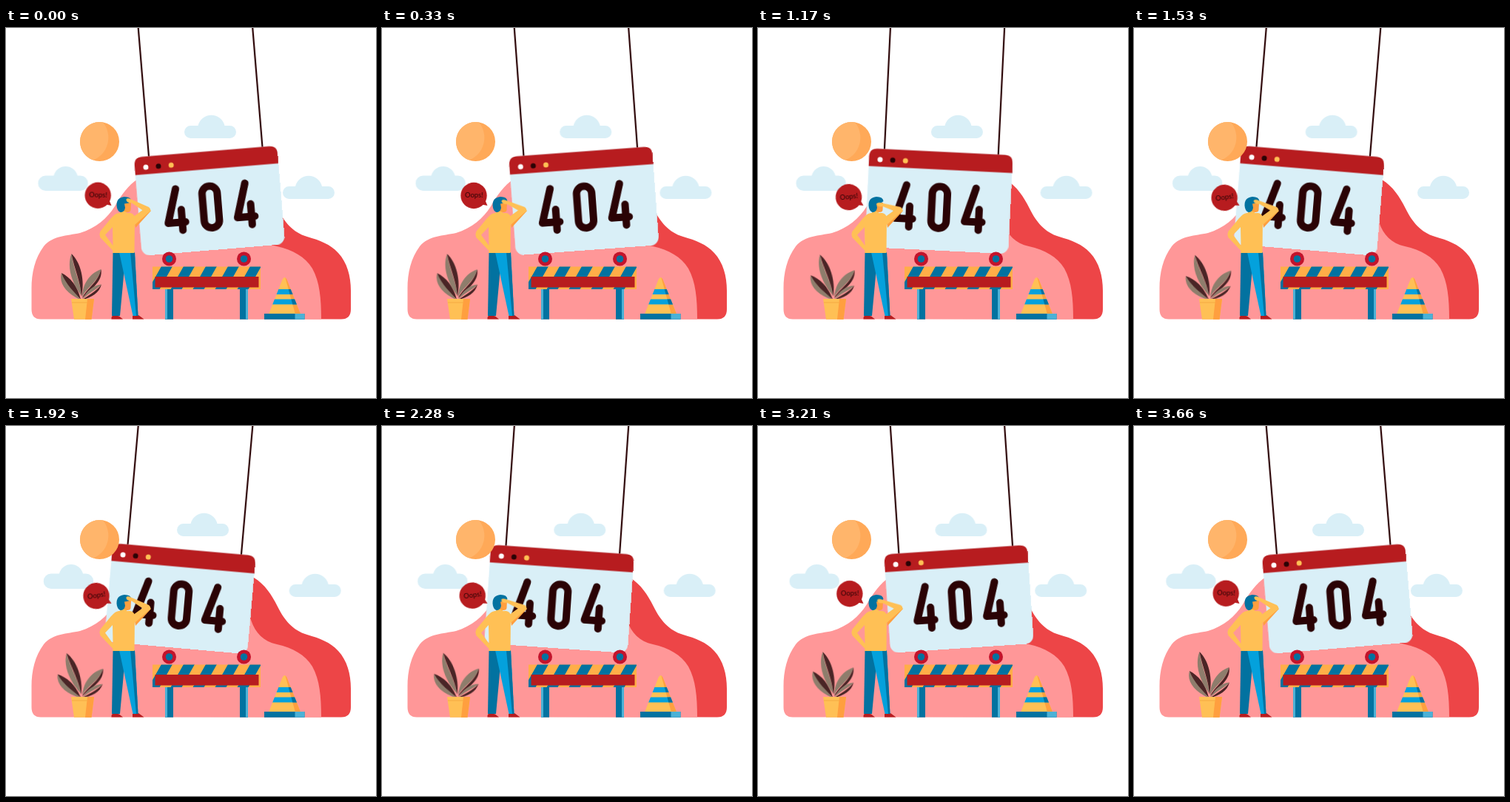
Animation, 500 px wide and 500 px high, one loop 3.69 s. Source, as an HTML page:

```html
<!DOCTYPE html>
<html lang="en">
<head>
<meta charset="utf-8">
<title>404</title>
<style>
  html, body { margin: 0; width: 100%; height: 100%; overflow: hidden; background: #fff; }
  svg { display: block; width: 100vw; height: 100vh; }
  .sky { fill: #d9eff7; }
  .red { fill: #b71c1f; }
  .yel { fill: #ffc055; }
  .org { fill: #ff9f3f; }
  .navy { fill: #0272a0; }
  .blue { fill: #04a1dc; }
  .pale { fill: #4bb1d6; }
  .dark { fill: #2a0305; }
  .ink { fill: none; stroke: #2a0305; }
  .num { stroke-width: 10; stroke-linecap: round; stroke-linejoin: round; }
  .leaf path:first-child { fill: #8e7d6c; }
  .leaf path:last-child { fill: #4a2526; }
  text { font: 9.4px Lato, sans-serif; text-anchor: middle; fill: #2a0305; }
</style>
</head>
<body>
<svg viewBox="0 0 500 500">
  <defs>
    <clipPath id="board"><path d="M198 322.500H344V353H198Z"/></clipPath>
    <clipPath id="coneCut"><path d="M373.500 340Q376.500 334 379.500 340L398 386.500H355Z"/></clipPath>
    <path id="four" class="ink num" d="M19 5.500L5.500 51H29M24.500 34V62"/>
  </defs>

  <g class="sky">
    <path id="cloudTop" d="M249.500 132H259.500A18.500 18.500 0 0 1 295.500 132H302.500A8.500 8.500 0 0 1 302.500 149H249.500A8.500 8.500 0 0 1 249.500 132Z"/>
    <path id="cloudLeft" d="M53 199.500H64A16.500 16.500 0 0 1 96 199.500H100A10 10 0 0 1 100 220H53A10 10 0 0 1 53 199.500Z"/>
    <path id="cloudRight" d="M382.500 214H391A18.500 18.500 0 0 1 427 214H435.500A8.500 8.500 0 0 1 435.500 231H382.500A8.500 8.500 0 0 1 382.500 214Z"/>
  </g>

  <path fill="#ed4547" d="M200 393V205H335C350 214 359 228 367 244C376 262 387 276 407 282C424 287 438 292 449 304C461 317 466 335 466 355V380Q466 393.500 453 393.500Z"/>
  <path fill="#ff9798" d="M47 393.500Q34.500 393.500 34.500 380V352C34.500 331 39 311 51 295C64 280 82 281 100 277C122 270 136 258 147 241C156 225 165 213 178 204H300C322 215 324 243 331 262C337 280 348 291 366 295C388 300 404 309 414 325C424 343 426 366 426 393.500Z"/>

  <g id="sign">
    <path class="ink" stroke-width="2.200" d="M179 -20V170M333 -20V170"/>
    <rect class="sky" x="158.800" y="167.500" width="194" height="133.500" rx="11"/>
    <path class="red" d="M158.800 191.500V178.500Q158.800 167.500 169.800 167.500H341.800Q352.800 167.500 352.800 178.500V191.500Z"/>
    <circle cx="173.800" cy="182" r="3.500" fill="#fff"/>
    <circle class="dark" cx="190.900" cy="182" r="3.500"/>
    <circle class="yel" cx="208.100" cy="182" r="3.500"/>
    <g role="img" aria-label="404">
      <use href="#four" x="192.300" y="209"/>
      <rect class="ink num" x="246.500" y="214.500" width="20.500" height="56.500" rx="10"/>
      <use href="#four" x="286.300" y="209"/>
    </g>
  </g>

  <circle cx="126.500" cy="153.500" r="26.500" fill="#ffa958"/>
  <path fill="#ffb56b" d="M131 127.400A26.500 26.500 0 0 0 118 178.600A33 33 0 0 0 131 127.400Z"/>

  <g id="lights"></g>
  <g clip-path="url(#board)">
    <path fill="#ffae48" d="M198 322H344V353H198Z"/>
    <g id="stripes"></g>
  </g>
  <path class="red" d="M201.500 336H341.500V350.500H201.500Z"/>

  <g clip-path="url(#coneCut)">
    <path class="yel" d="M350 335H402V387H350Z"/>
    <path class="org" d="M376.500 334H402V387H391Z"/>
    <path class="blue" d="M350 353H402V360H350ZM350 366.500H402V373.500H350Z"/>
    <path class="navy" d="M381.700 353H402V360H383.600ZM385.400 366.500H402V373.500H387.300Z"/>
  </g>
  <path class="navy" d="M349 386H403.500V393.700H349Z"/>
  <path class="pale" d="M390.500 386H403.500V393.700H390.500Z"/>

  <g id="leafLeft" class="leaf">
    <path d="M75 331C71 345 81 358 100 367C93 355 81 345 75 331Z"/>
    <path d="M75 331C87 337 97 349 101 367C92 356 81 347 75 331Z"/>
  </g>
  <g id="leafMid" class="leaf">
    <path d="M88.500 305C82 322 88 343 102 362C101 345 91 325 88.500 305Z"/>
    <path d="M88.500 305C101 317 107 341 102 363C101 343 92 325 88.500 305Z"/>
  </g>
  <g id="leafRight" class="leaf">
    <path d="M128.500 326C112 332 103 347 103 364C108 351 125 343 128.500 326Z"/>
    <path d="M128.500 326C131 342 117 351 103 365C109 352 125 343 128.500 326Z"/>
  </g>
  <g id="leafLow" class="leaf">
    <path d="M129 346.500C119 347 109 355 103 367C111 358 121 355 129 346.500Z"/>
    <path d="M129 346.500C126 358 116 364 103 367.500C111 361 121 357 129 346.500Z"/>
  </g>
  <path class="yel" d="M88 366H119L115.500 393.700H92Z"/>
  <path class="org" d="M110 366H119L115.500 393.700H107Z"/>
  <path fill="#f5a940" d="M89 370.500H110V371.500H89Z"/>

  <path class="red" d="M142.500 393.500Q142 388 147 388L153 389.500L158 393.500ZM171 393.500V389L179 388L186.500 393.500Z"/>
  <path class="navy" d="M144.500 303H162L154 389H143Z"/>
  <path class="blue" d="M153 303H174L178.500 389H171.500Z"/>
  <path class="navy" d="M168 303H174L178.500 389H176Z"/>
  <path class="yel" d="M145 254Q150 249 158 250H168Q173 251 174 256L173.500 304H144L144.500 301L127.300 283Q125.500 279 127.300 275L142 257ZM144 269L134 279.500L144.500 294Z"/>
  <path class="yel" d="M154 236H163V254H154Z"/>
  <path class="org" d="M158 236H169L168.500 246Q168 249.500 163 249L158 247Z"/>
  <path class="navy" d="M149.500 240Q149 229 160 228Q169 228 169.500 234Q167 237 160 237.500L161 243Q160 249 154.500 249Q150 247 149.500 240Z"/>
  <path class="org" d="M174 263L192 246L196 247L175 270Z"/>
  <path class="yel" d="M168 258L186 245L196 246.500L174 266Z"/>
  <path id="arm" class="yel" d="M162.500 231.500Q164 229 169 231.500L193 242Q197 245.500 194 248.500L187 248L170 236.500Q162 236 162.500 231.500Z"/>

  <g id="bubble">
    <circle class="red" cx="124" cy="226.500" r="17.700"/>
    <path class="red" d="M139 232L142.500 240L132 238Z"/>
    <text x="124.300" y="229.300">Oops!</text>
  </g>
</svg>
<script>
  const T = 3690;
  const SINE = 'cubic-bezier(.37,0,.63,1)';
  const $ = id => document.getElementById(id);
  const rot = a => `rotate(${a}deg)`;
  const shift = x => `translateX(${x}px)`;

  function draw(parent, tag, attrs) {
    const el = document.createElementNS('http://www.w3.org/2000/svg', tag);
    for (const k in attrs) el.setAttribute(k, attrs[k]);
    $(parent).append(el);
  }

  for (let i = 0; i < 5; i++) {
    draw('stripes', 'path', { class: 'navy', d: `M${210 + i * 30} 322h15l-18 32h-15Z` });
  }
  // Each post is lit on its outer edge
  for (const [x, side] of [[220.5, -1], [321.5, 1]]) {
    draw('lights', 'path', { class: 'navy', d: `M${x - 5.5} 350h11v43.700h-11Z` });
    draw('lights', 'path', { class: 'pale', d: `M${x + side * 5.5} 350h${-side * 3}v43.700h${side * 3}Z` });
    draw('lights', 'circle', { fill: '#c3142c', cx: x, cy: 312, r: 9.5 });
    draw('lights', 'circle', { class: 'navy', cx: x, cy: 312, r: 4.8 });
  }

  // Back-and-forth motion between two transforms
  function sway(id, from, to, { pivot = '0 0', delay = 0, half = T / 2 } = {}) {
    const el = $(id);
    el.style.transformOrigin = pivot;
    el.animate({ transform: [from, to] }, {
      duration: half, delay, easing: SINE, direction: 'alternate', iterations: Infinity
    });
  }

  sway('cloudTop', shift(0), shift(-10));
  sway('cloudLeft', shift(-0.4), shift(9.2), { delay: -370 });
  sway('cloudRight', shift(-0.3), shift(9.1), { delay: -190 });
  sway('bubble', rot(1), rot(-9.5), { pivot: '142px 240px' });
  sway('arm', rot(0), rot(-14), { pivot: '192px 245px', half: T / 4 });
  sway('leafLeft', rot(0), rot(-9), { pivot: '101px 367px' });
  sway('leafMid', rot(0), rot(-6.5), { pivot: '102px 365px' });
  sway('leafRight', rot(0), rot(4), { pivot: '103px 366px' });
  sway('leafLow', rot(0), rot(5), { pivot: '103px 367px' });

  $('sign').style.transformOrigin = '256px 0px';
  const left = rot(5.1), right = rot(-4.7), easing = 'cubic-bezier(.5,0,.5,1)';
  $('sign').animate([
    { transform: right, offset: 0, easing },
    { transform: left, offset: 0.492, easing },
    { transform: right, offset: 0.984 },
    { transform: right, offset: 1 }
  ], { duration: T, iterations: Infinity });
</script>
</body>
</html>
```
